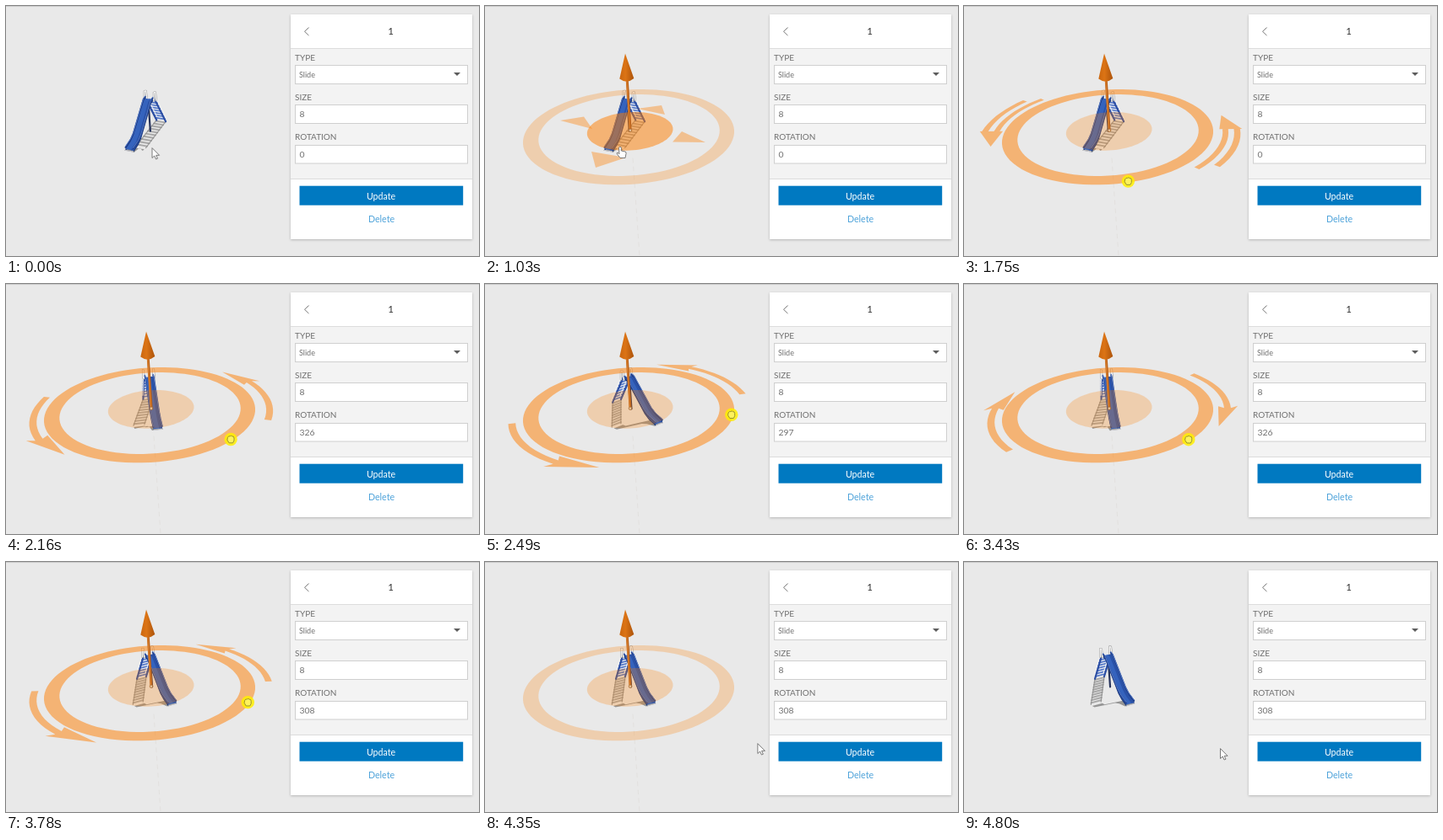
An HTML page with a canvas for the animation above (4860 ms loop, 560x297 px).

```html
<!DOCTYPE html>
<html lang="en">
<head>
<meta charset="utf-8">
<title>Slide rotation</title>
<style>
  html, body { margin: 0; width: 560px; height: 297px; overflow: hidden; background: #e9e9e9; }
  svg, canvas { position: absolute; left: 0; top: 0; width: 560px; height: 297px; }
  #panel { filter: drop-shadow(0 1px 1.5px rgba(0, 0, 0, .22)); }
  text { font: 10px Lato, "Open Sans", sans-serif; fill: #707070; }
  .value { font-size: 10.4px; }
  .mid { text-anchor: middle; font-size: 10.6px; }
  .box { fill: #fff; stroke: #cfcfcf; }
  .rule { stroke: #dcdcdc; }
</style>
</head>
<body>
<svg viewBox="0 0 560 297">
  <path d="M0 .5H560" stroke="#cdcdcd"/>
  <g id="panel">
    <rect x="337" y="10" width="215" height="267" fill="#fff"/>
    <rect x="337" y="50" width="215" height="155" fill="#f3f3f3"/>
  </g>
  <path class="rule" d="M337 50.5H552M337 205.5H552"/>
  <path d="M358.5 25.5L353.5 30.3L358.5 35" fill="none" stroke="#777"/>
  <text class="mid" x="455.500" y="33.700" style="font-size:11.5px;fill:#333">1</text>
  <text x="342" y="64.500">TYPE</text>
  <rect class="box" x="342.5" y="70.5" width="204" height="22"/>
  <text x="347" y="84.700" style="font-size:9px">Slide</text>
  <path d="M530 79H538L534 83Z" fill="#5c5c5c"/>
  <text x="342" y="111.500">SIZE</text>
  <rect class="box" x="342.5" y="117.5" width="204" height="22"/>
  <text class="value" x="347.5" y="132.300">8</text>
  <text x="342" y="158.800">ROTATION</text>
  <rect class="box" x="342.5" y="165.5" width="204" height="21.5"/>
  <text class="value" x="347.5" y="179.700" id="angle">0</text>
  <rect x="347.5" y="213.700" width="193.700" height="23" fill="#0079c1"/>
  <text class="mid" x="444" y="229.5" style="fill:#fff">Update</text>
  <text class="mid" x="444.5" y="256.500" style="fill:#4ea3da">Delete</text>
</svg>
<canvas id="stage"></canvas>
<script>
const LOOP = 4860;
const canvas = document.getElementById('stage');
const label = document.getElementById('angle');
const g = canvas.getContext('2d');
const dpr = window.devicePixelRatio || 1;
canvas.width = 560 * dpr;
canvas.height = 297 * dpr;
g.scale(dpr, dpr);
g.lineJoin = g.lineCap = 'round';

// Rows are [time, value, ...], joined by straight lines.
function track(rows, t) {
  if (t <= rows[0][0]) return rows[0].slice(1);
  for (let i = 1; i < rows.length; i++) {
    const a = rows[i - 1], b = rows[i];
    if (t < b[0]) {
      const k = (t - a[0]) / (b[0] - a[0]);
      return a.slice(1).map((v, j) => v + (b[j + 1] - v) * k);
    }
  }
  return rows[rows.length - 1].slice(1);
}

const turn = [[1850, 0], [2360, -56], [2490, -63], [2700, -80], [2970, -62], [3070, -60],
  [3430, -34], [3530, -31], [3630, -31], [3780, -52]];
const approach = [[100, 173, 169], [330, 147, 150], [560, 158, 166], [680, 160, 167],
  [1280, 160, 167], [1680, 193, 204]];
const leave = [[4020, 286, 167], [4200, 329, 210], [4350, 323, 216], [4500, 303.5, 222]];

// Ground plane in perspective; the outer ring has radius 1, h is height in pixels.
function project(x, z, h = 0) {
  const w = 1 - .143 * z + .02 * x;
  return [172 + (123.7 * x + 3.6 * z - .07 * h) / w, 147.5 + (54.9 * z - 8 * x - h) / w];
}
function polar(r, deg) {
  const a = deg * Math.PI / 180;
  return project(r * Math.cos(a), r * Math.sin(a));
}
function arc(r, from, to) {
  const n = Math.ceil(Math.abs(to - from) / 4);
  return Array.from({ length: n + 1 }, (_, i) => polar(r, from + (to - from) * i / n));
}
const band = (r0, r1, from, to) => [...arc(r0, from, to), ...arc(r1, to, from)];

function trace(pts) {
  pts.forEach((p, i) => i ? g.lineTo(...p) : g.moveTo(...p));
}
function fill(color, ...shapes) {
  g.beginPath();
  shapes.forEach(s => { trace(s); g.closePath(); });
  g.fillStyle = color;
  g.fill('evenodd');
}
function line(color, width, ...pts) {
  g.beginPath();
  trace(pts);
  g.strokeStyle = color;
  g.lineWidth = width;
  g.stroke();
}
const orange = alpha => `rgba(255,127,0,${alpha})`;

const chute = [[0, 37], [.04, 36], [.1, 29], [.28, 8], [.34, 4], [.44, 1]];
const HALF = .05, BED = .04;

function drawSlide(rot) {
  const a = (118 + rot) * Math.PI / 180, c = Math.cos(a), s = Math.sin(a);
  const at = (u, o, h) => project(u * c - o * s, u * s + o * c, h);
  const shade = (u, o, h) => project(u * c - o * s - .0032 * h, u * s + o * c + .0097 * h);
  const side = (f, o, lift = 0) => chute.map(([u, h]) => f(u, o, h + lift));
  const strip = (f, o0, l0, o1, l1) => [...side(f, o0, l0), ...side(f, o1, l1).reverse()];
  const rung = k => [-.03 - .19 * k, 37 * (1 - k)];

  // shadow
  fill('rgba(120,120,120,.75)', strip(shade, -HALF, 0, HALF, 0));
  for (let k = .06; k < 1; k += .1) {
    const [u, h] = rung(k);
    line('rgba(150,150,150,.8)', 1.9, shade(u, -HALF, h), shade(u, HALF, h));
  }
  for (const o of [-HALF, HALF])
    line('rgba(140,140,140,.8)', 1.2, shade(-.03, o, 37), shade(-.22, o, 0));

  // ladder
  for (let k = .08; k < 1; k += .115) {
    const [u, h] = rung(k);
    line('#5478c8', 2, at(u, -HALF, h), at(u, HALF, h));
    line('#dfe5f1', .9, at(u, -HALF, h + 1.2), at(u, HALF, h + 1.2));
  }
  for (const o of [-HALF, HALF]) {
    line('#2b4da3', 2.1, at(-.01, o, 38), at(-.22, o, 0));
    line('#f2f2f2', 1, at(-.05, o, 37), at(-.23, o, 4));
    line('#a2a2a2', 2.4, at(0, o, 36), at(-.01, o, 45), at(-.04, o, 44), at(-.05, o, 34));
    line('#f5f5f5', 1.3, at(0, o, 36), at(-.01, o, 45), at(-.04, o, 44), at(-.05, o, 34));
  }
  line('#27345c', 2.2, at(.02, 0, 34), at(.02, 0, 0));

  // chute
  fill('#1c3777', strip(at, -BED, -2, -BED, 3), strip(at, BED, -2, BED, 3));
  fill('#3563bd', strip(at, -BED, 0, BED, 0));
  fill('#2a52a8', strip(at, -BED, 0, -BED * .3, 0));
  for (const o of [BED, -BED]) {
    line('#1f3f8d', 1.8, ...side(at, o, 2));
    line('#6288d2', .8, ...side(at, o, 3));
  }
  line('#c9c9cf', 1, at(.445, -BED, 0), at(.445, BED, 0));
}

function drawArrows(rot, dir, double) {
  const mid = rot + (double ? 19 : dir < 0 ? 22 : 29);
  g.save();
  g.translate(2.5, 0);
  for (const m of [mid, mid + 180]) {
    const tip = m + dir * (double ? 28 : 33);
    const base = tip - dir * (double ? 16 : 20);
    const tail = m - dir * (double ? 31 : 33);
    if (double) {
      fill(orange(.5), [polar(1.04, base), polar(1.12, tip), polar(1.26, base)]);
      fill(orange(.5), band(1.07, 1.125, base, tail));
      fill(orange(.5), band(1.18, 1.24, base, tail + dir * 7));
    } else {
      fill(orange(.5), [...arc(1.085, tail, base), polar(1.03, base - dir * 2),
        polar(1.085, tip), polar(1.22, base - dir * 2), ...arc(1.15, base, tail)]);
    }
  }
  g.restore();
}

function drawGizmo(onDisc, onRing) {
  g.setLineDash([5, 5]);
  line('#e2e0de', 1, [175, 181], [183, 297]);
  g.setLineDash([]);
  fill(orange(onRing ? .5 : .25), arc(1, 0, 360), arc(.86, 0, 360));
  fill(orange(onDisc ? .5 : .25), arc(.41, 0, 360));
  if (onDisc) {
    fill(orange(.38),
      [[89, 136], [117, 131.5], [127, 146]],
      [[209, 118], [180, 122], [213, 129]],
      [[261, 162], [233, 149], [222, 161.5]],
      [[131, 192], [126, 173], [167, 180]]);
  }
  line('#b8601a', 3, [168.3, 89], [172, 146]);
  line('#dd8431', 1.2, [167.8, 89], [171.5, 146]);
  g.beginPath();
  g.arc(172, 147.7, 1.8, 0, 7);
  g.fillStyle = '#e5c39d';
  g.fill();
  g.strokeStyle = '#a9692c';
  g.lineWidth = .8;
  g.stroke();
  const tone = g.createLinearGradient(159, 0, 177, 0);
  tone.addColorStop(0, '#c9660f');
  tone.addColorStop(.4, '#dc7415');
  tone.addColorStop(1, '#a9510a');
  g.beginPath();
  g.moveTo(166, 56.5);
  g.lineTo(159.3, 86.5);
  g.quadraticCurveTo(168, 93, 176.3, 86);
  g.closePath();
  g.fillStyle = tone;
  g.fill();
}

function icon(x, y, path, inside = '#fff', edge = '#6c6c6c') {
  g.save();
  g.translate(x, y);
  g.fillStyle = inside;
  g.strokeStyle = edge;
  g.lineWidth = .9;
  g.fill(path);
  g.stroke(path);
  g.restore();
}
const pointer = new Path2D('M0 0V11.5L2.700 9L4.600 13L6.500 12.200L4.700 8.300H8.200Z');
const hand = new Path2D('M-1.300 1Q0-.8 1.300 1V5L6 6Q7.500 6.500 7 8.500L6 13.500H0L-3.500 9' +
  'Q-4.500 7-2.800 7.200L-1.300 8.500Z');
const fist = new Path2D('M-3.500-2.500Q-2.500-4.500-1-3.600Q.5-5 1.800-3.500Q3.800-4 3.900-1.500V1.500' +
  'L2.500 4.300H-2L-4 1Z');

function drawCursor(t, rot) {
  if (t >= 1700 && t < 4020) {
    const [x, y] = polar(.98, 82.5 + 1.05 * rot);
    g.beginPath();
    g.arc(x, y, 7.7, 0, 7);
    g.fillStyle = 'rgba(255,238,0,.85)';
    g.fill();
    icon(x, y, fist, '#fff25c', '#8d8a2a');
    return;
  }
  const [x, y] = track(t < 1700 ? approach : leave, t);
  icon(x, y, t < 640 || t >= 4130 ? pointer : hand);
}

function draw(t) {
  const [rot] = track(turn, t);
  g.clearRect(0, 0, 560, 297);
  drawSlide(rot);
  if (t >= 750 && t < 4670) {
    const onRing = t >= 1560 && t < 4130;
    drawGizmo(t < 1420, onRing);
    const held = t >= 1850 && t < 4020;
    if (onRing) drawArrows(rot, held && t >= 2720 && t < 3640 ? 1 : -1, !held);
  }
  drawCursor(t, rot);
  label.textContent = (360 + Math.round(rot)) % 360;
}

const start = performance.now();
function tick() {
  draw((performance.now() - start) % LOOP);
  requestAnimationFrame(tick);
}
tick();
</script>
</body>
</html>
```
